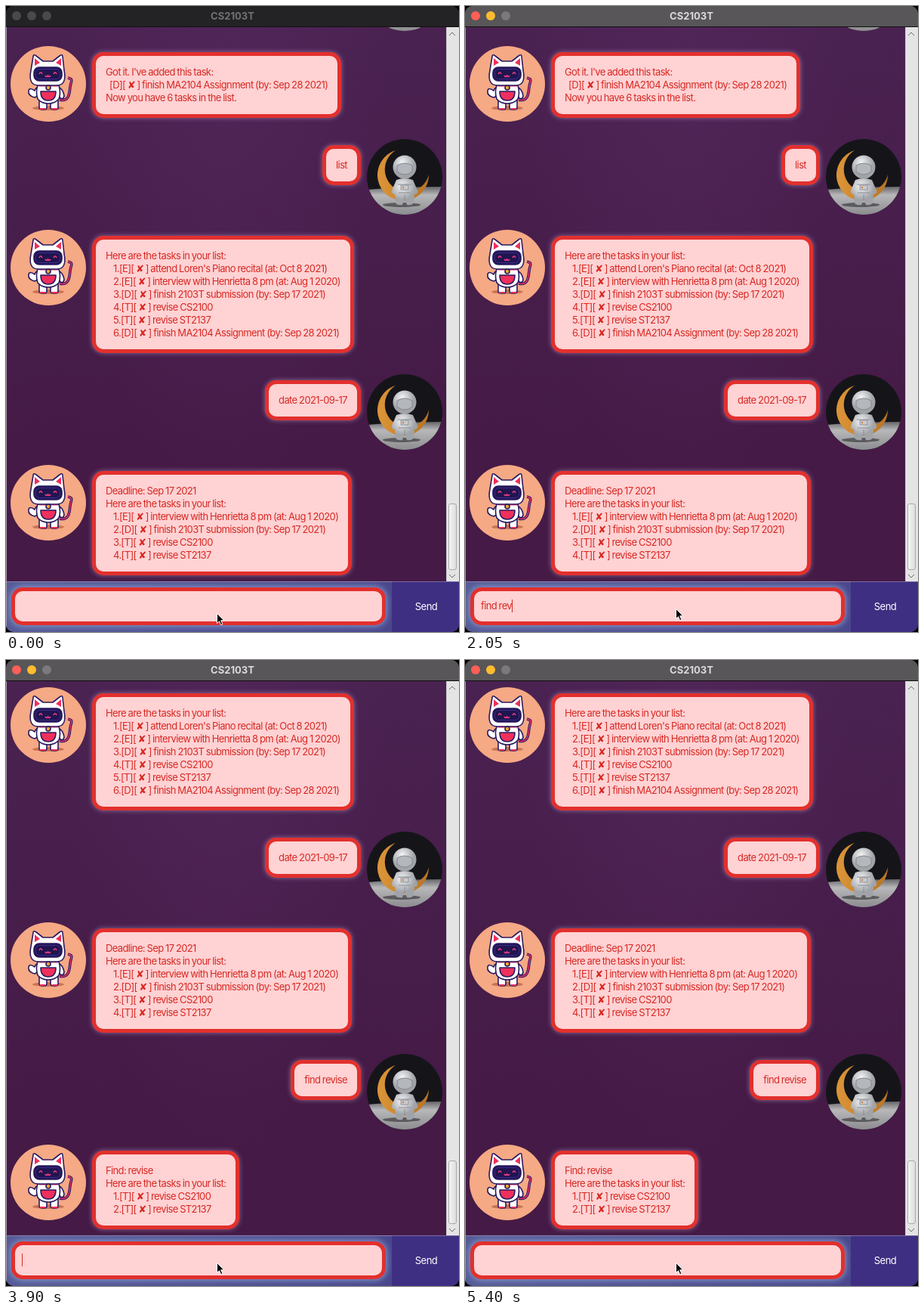
Animation of 600x828 px, one loop 5450 ms. Source, as an HTML page:

```html
<!DOCTYPE html>
<html lang="en">
<head>
<meta charset="utf-8">
<title>Task chat</title>
<style>
  html, body { margin: 0; width: 100%; height: 100%; overflow: hidden; background: #000; }
  body { font: 13px/17px Inter, "DejaVu Sans", sans-serif; }
  #win { position: relative; width: 600px; height: 828px; overflow: hidden; border-radius: 10px; background: #451a46; }
  #win > * { position: absolute; box-sizing: border-box; }
  #bar { inset: 0 0 auto; height: 28px; z-index: 1; background: #232224; color: #737174; border-bottom: 1px solid #111;
    font-weight: 700; line-height: 26px; text-align: center; }
  #bar i { position: absolute; top: 7px; width: 12px; height: 12px; border-radius: 50%; background: #4a484b; }
  #bar.active { background: #585658; color: #dcdadc; }
  #bar.active i { background: var(--on); }
  #chat { left: 0; top: 28px; width: 583px; height: 733px; overflow: hidden;
    display: flex; flex-direction: column; justify-content: flex-end; gap: 20px; padding: 0 5px 0 6px;
    background: radial-gradient(ellipse 220px 640px at 50% 0, #54285d99, #4b225300 100%), linear-gradient(#4a2251, #451a46 75%); }
  .row { display: flex; flex: none; min-height: 100px; align-items: flex-start; }
  .row.user { flex-direction: row-reverse; }
  .row svg { flex: none; width: 100px; height: 100px; }
  .bubble, #field { box-sizing: border-box; border: 5px solid #e2302d; border-radius: 15px; background: #ffd2d4;
    color: #d72922; white-space: pre; letter-spacing: -.63px; word-spacing: -.5px; }
  .bubble { margin: 8px; padding: 13px; box-shadow: 0 0 6px #b9a3cf99; }
  #scroll { left: 583px; top: 28px; width: 17px; height: 733px; background: #e5e4e5; border-left: 1px solid #c9c8ca; }
  #thumb { position: absolute; left: 2px; width: 11px; bottom: 15px; box-sizing: border-box;
    border: 1px solid #a9a8aa; border-radius: 3px; background: linear-gradient(90deg, #f4f4f4, #dedddf); }
  #scroll svg { position: absolute; left: 0; top: 0; }
  #foot { left: 0; top: 761px; width: 511px; height: 67px; background: linear-gradient(90deg, #565b97, #4a478c); border-top: 1px solid #8a80ad; }
  #field { left: 7px; top: 769px; width: 496px; height: 50px; padding: 11px 9px; box-shadow: 0 0 8px 1px #8aa0d0; }
  #caret { display: inline-block; width: 1px; height: 17px; vertical-align: top; background: #d72922; }
  #send { left: 511px; top: 761px; width: 89px; height: 67px; background: #3f2f82; border-top: 1px solid #7a6ca6;
    color: #fff; line-height: 65px; text-align: center; padding-left: 2px; letter-spacing: -.5px; }
  #cursor { left: 278px; top: 0; }
  #edge { left: 0; top: 28px; width: 1px; bottom: 0; background: #a39aa8; }
</style>
</head>
<body>
<svg width="0" height="0" style="position:absolute">
  <linearGradient id="gold"><stop stop-color="#dc9538"/><stop offset="1" stop-color="#b87425"/></linearGradient>
  <radialGradient id="silver" cx=".4" cy=".3"><stop stop-color="#f4f5f6"/><stop offset="1" stop-color="#a0a3a8"/></radialGradient>
  <linearGradient id="floor" x2="0" y2="1"><stop stop-color="#66666a"/><stop offset=".3" stop-color="#b8b8ba"/><stop offset="1" stop-color="#8c8c90"/></linearGradient>
  <clipPath id="disc"><circle cx="50" cy="50" r="50"/></clipPath>
  <symbol id="bot" viewBox="0 0 100 100">
    <circle cx="50" cy="50" r="50" fill="#f5a984"/>
    <ellipse cx="50" cy="82" rx="21" ry="3" fill="#c97454"/>
    <g stroke="#2a1a60" stroke-width="1.6" stroke-linejoin="round" fill="#fff">
      <path d="M65 71C78 74 78 62 79 54S84 44 76 42" fill="none" stroke-width="3.6"/>
      <path d="M65 71C78 74 78 62 79 54S84 44 76 42" fill="none" stroke="#ef2f66" stroke-width="1.5"/>
      <path d="M38 68v13q0 3 4 3h3q3 0 3-3V70zM53 70v11q0 3 4 3h3q3 0 3-3V68z"/>
      <path d="M36 54q-3 2-4 5q-7-5-8 0q-1 7 8 9l6-3zM63 54q7 3 8 12q-1 5-5 3l-4-7z"/>
      <path d="M36 52h28q3 10 0 18q-5 6-14 6t-14-6q-3-9 0-18z"/>
      <path d="M40 60h20q0 12-10 12T40 60z" fill="#ef2f5c"/>
      <path d="M38 52h25" stroke="#ef2f66" stroke-width="3"/>
      <path d="M30 14q0-4 4-1l9 7h13l9-7q4-3 4 1l2 18q4 20-10 20H37q-14 0-10-20z"/>
      <path d="M32 16l7 6-7 4zM67 16l-7 6 7 4z" fill="#ef2f5c" stroke="none"/>
      <rect x="31" y="28" width="37" height="18" rx="7" fill="#20154f"/>
      <circle cx="50" cy="55" r="3" fill="#f6a52d"/>
    </g>
    <rect x="33.500" y="30.500" width="32" height="13" rx="5" fill="none" stroke="#3c2c90"/>
    <path d="M38 37q2-4.500 4 0M57 37q2-4.500 4 0M46 39q2 3 3.500 0q2 3 3.500 0" fill="none" stroke="#f23d83" stroke-width="1.600"/>
    <path d="M39 83h7M55 83h7" stroke="#ef2f5c" stroke-width="2"/>
  </symbol>
  <symbol id="user" viewBox="0 0 100 100">
    <g clip-path="url(#disc)">
      <path d="M0 0h100v100H0z" fill="#151519"/>
      <path d="M0 67q50-4 100-4v37H0z" fill="url(#floor)"/>
      <ellipse cx="46" cy="87" rx="25" ry="3" fill="#5b5a5d"/>
      <path d="M38 15A34 34 0 1 0 82 47A29.500 29.500 0 1 1 38 15z" fill="url(#gold)"/>
      <g fill="url(#silver)">
        <path d="M39 54q11-4 22 0l6 14q1 5-4 5l-1 11q-2 4-9 3l-3-8-3 8q-8 1-9-3l-1-11q-5 0-4-5z"/>
        <circle cx="50" cy="37" r="15.500"/>
      </g>
      <path d="M40 35q10-6 20 0v8q-10 8-20 0z" fill="#b4b7bc" stroke="#85888e"/>
      <path d="M41 60h18M42 71h16M50 73v8" stroke="#8b8e94" fill="none"/>
      <path d="M45 61h10v6H45z" fill="#c9cbd0" stroke="#7f838a" stroke-width=".8"/>
      <circle cx="48" cy="64" r="1.200" fill="#e07a3c"/>
    </g>
  </symbol>
</svg>
<div id="win">
  <div id="bar">CS2103T<i style="left:8px;--on:#fe5f57"></i><i style="left:28px;--on:#febc2e"></i><i style="left:48px;--on:#7b797c"></i></div>
  <div id="chat"></div>
  <div id="scroll">
    <svg width="16" height="733" fill="none" stroke="#69686b"><path d="M3 11l4-4 4 4M3 724l4 4 4-4"/></svg>
    <div id="thumb"></div>
  </div>
  <div id="foot"></div>
  <div id="field"><span id="typed"></span><span id="caret"></span></div>
  <div id="send">Send</div>
  <div id="edge"></div>
  <svg id="cursor" width="14" height="20"><path d="M1.500 1.500v13l3-2.800 2.200 5 2.200-1-2.200-4.900h4.200z" stroke="#fff"/></svg>
</div>
<script>
const LOOP = 5450, ACTIVATE = 300, TYPE_START = 1100, KEY = 120, ENTER = 2490, REVEAL = 1000, BLINK = 500;
const $ = id => document.getElementById(id);

const heading = 'Here are the tasks in your list:';
const query = 'find revise';
const task = (kind, text) => `[${kind}][ ✘ ] ${text}`;
const interview = task('E', 'interview with Henrietta 8 pm (at: Aug 1 2020)');
const submission = task('D', 'finish 2103T submission (by: Sep 17 2021)');
const assignment = task('D', 'finish MA2104 Assignment (by: Sep 28 2021)');
const recital = task('E', "attend Loren's Piano recital (at: Oct 8 2021)");
const revisions = [task('T', 'revise CS2100'), task('T', 'revise ST2137')];
const list = tasks => [heading, ...tasks.map((item, i) => `    ${i + 1}.${item}`)].join('\n');

const history = [
  ['user', 'deadline'],
  ['bot', `Got it. I've added this task:\n  ${assignment}\nNow you have 6 tasks in the list.`],
  ['user', 'list'],
  ['bot', list([recital, interview, submission, ...revisions, assignment])],
  ['user', 'date 2021-09-17'],
  ['bot', 'Deadline: Sep 17 2021\n' + list([interview, submission, ...revisions])],
];
const reply = 'Find: revise\n' + list(revisions);

function addRow([who, text]) {
  const row = document.createElement('div');
  row.className = 'row ' + who;
  row.innerHTML = `<svg><use href="#${who}"/></svg><div class="bubble"></div>`;
  row.lastChild.textContent = text;
  $('chat').append(row);
  return row;
}
history.forEach(addRow);
const added = [['user', query], ['bot', reply]].map(message => ({ text: message[1], row: addRow(message) }));

const clamp = x => Math.min(1, Math.max(0, x));
// Quadratic acceleration and braking over the outer fifths
function easeBoth(x) {
  if (x < .2) return 3.125 * x * x;
  return x > .8 ? 1 - 3.125 * (1 - x) ** 2 : 1.25 * x - .125;
}

function draw(t) {
  const sent = t >= ENTER;
  const shown = easeBoth(clamp((t - ENTER) / REVEAL));
  for (const { text, row } of added) {
    row.style.display = sent ? '' : 'none';
    row.lastChild.textContent = text.slice(0, Math.floor(text.length * shown));
  }
  $('thumb').style.height = (sent ? 84 : 88) + 'px';
  $('bar').className = t >= ACTIVATE ? 'active' : '';

  const keys = Math.max(0, Math.floor((t - TYPE_START) / KEY) + 1);
  const typing = keys > 0 && !sent;
  $('typed').textContent = typing ? query.slice(0, keys) : '';
  const blinkOn = Math.floor((t - (sent ? ENTER : ACTIVATE - 50)) / BLINK) % 2 === 0;
  $('caret').style.visibility = typing || (t >= ACTIVATE && blinkOn) ? 'visible' : 'hidden';
  $('cursor').style.top = 802 - 6 * easeBoth(clamp(t / ACTIVATE)) + 'px';
}

const start = performance.now();
(function tick() {
  draw((performance.now() - start) % LOOP);
  requestAnimationFrame(tick);
})();
</script>
</body>
</html>
```
